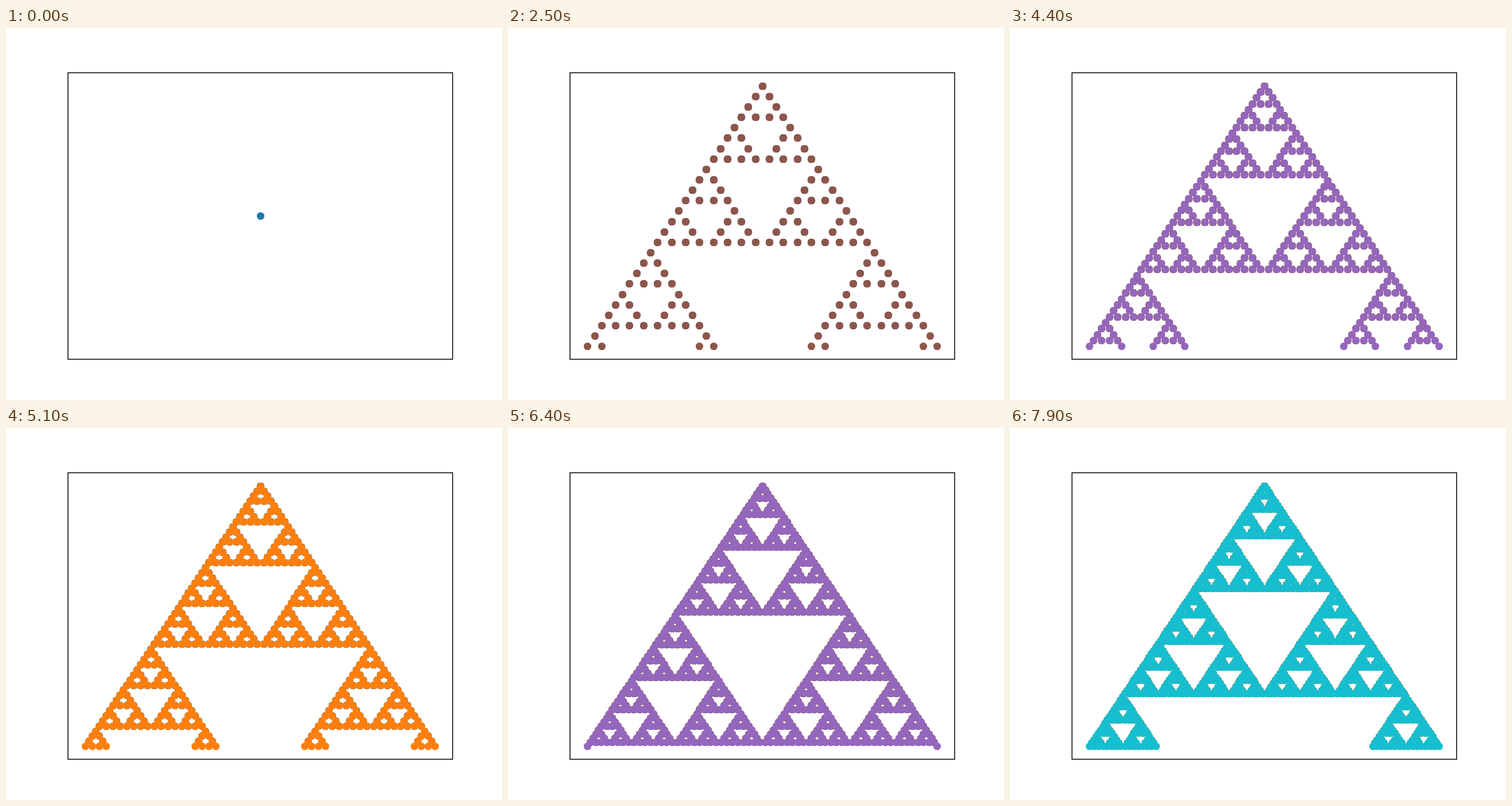
Recreate the animation shown at these times as an HTML page with a canvas. Size 864x648 px, loop 8000 ms.

```html
<!DOCTYPE html>
<html lang="en">
<head>
<meta charset="utf-8">
<title>Growing binomial triangle</title>
<style>
  html, body { margin: 0; width: 100%; height: 100%; overflow: hidden; background: #fff; }
  canvas { display: block; }
</style>
</head>
<body>
<canvas id="stage" width="864" height="648"></canvas>
<script>
const STEP_MS = 100;
const STEPS = 80;
const RADIUS = 6.5625;
const SPRITE = 17;
const COLORS = ['#1f77b4', '#ff7f0e', '#2ca02c', '#d62728', '#9467bd',
                '#8c564b', '#e377c2', '#7f7f7f', '#bcbd22', '#17becf'];
const AXES = { left: 108, top: 78, right: 778, bottom: 577 };
const PLOT = { cx: 442.8, cy: 327.24, halfWidth: 304.36, halfHeight: 226.8 };

const ctx = document.getElementById('stage').getContext('2d');

function makeDot(color) {
  const canvas = document.createElement('canvas');
  canvas.width = canvas.height = SPRITE;
  const c = canvas.getContext('2d');
  c.fillStyle = color;
  c.beginPath();
  c.arc(SPRITE / 2, SPRITE / 2, RADIUS, 0, 2 * Math.PI);
  c.fill();
  return canvas;
}

const dots = COLORS.map(makeDot);

// Odd entries of the binomial triangle, scaled to fit rows 0..last.
function layout(last) {
  const scale = last || 1;
  const rows = [];
  for (let row = 0; row <= last; row++) {
    const points = [];
    const y = PLOT.cy + PLOT.halfHeight * (2 * row - last) / scale;
    for (let k = 0; k <= row; k++) {
      if ((row & k) !== k) continue;
      const x = PLOT.cx + PLOT.halfWidth * (2 * k - row) / scale;
      points.push([Math.round(x) - 8, Math.round(y + 0.2) - 8]);
    }
    rows.push(points);
  }
  return rows;
}

function draw(last) {
  ctx.fillStyle = '#fff';
  ctx.fillRect(0, 0, 864, 648);

  // Every step repaints all its rows over the earlier ones, which firms up the dot edges.
  const rows = layout(last);
  for (let layer = 0; layer <= last; layer++) {
    const dot = dots[layer % dots.length];
    for (let row = 0; row <= layer; row++) {
      for (const [x, y] of rows[row]) ctx.drawImage(dot, x, y);
    }
  }

  ctx.strokeStyle = '#000';
  ctx.lineWidth = 1.5;
  ctx.strokeRect(AXES.left, AXES.top, AXES.right - AXES.left, AXES.bottom - AXES.top);
}

const start = performance.now();
let shown = -1;

function tick() {
  const step = Math.floor((performance.now() - start) / STEP_MS) % STEPS;
  if (step !== shown) draw(shown = step);
  requestAnimationFrame(tick);
}
tick();
</script>
</body>
</html>
```
